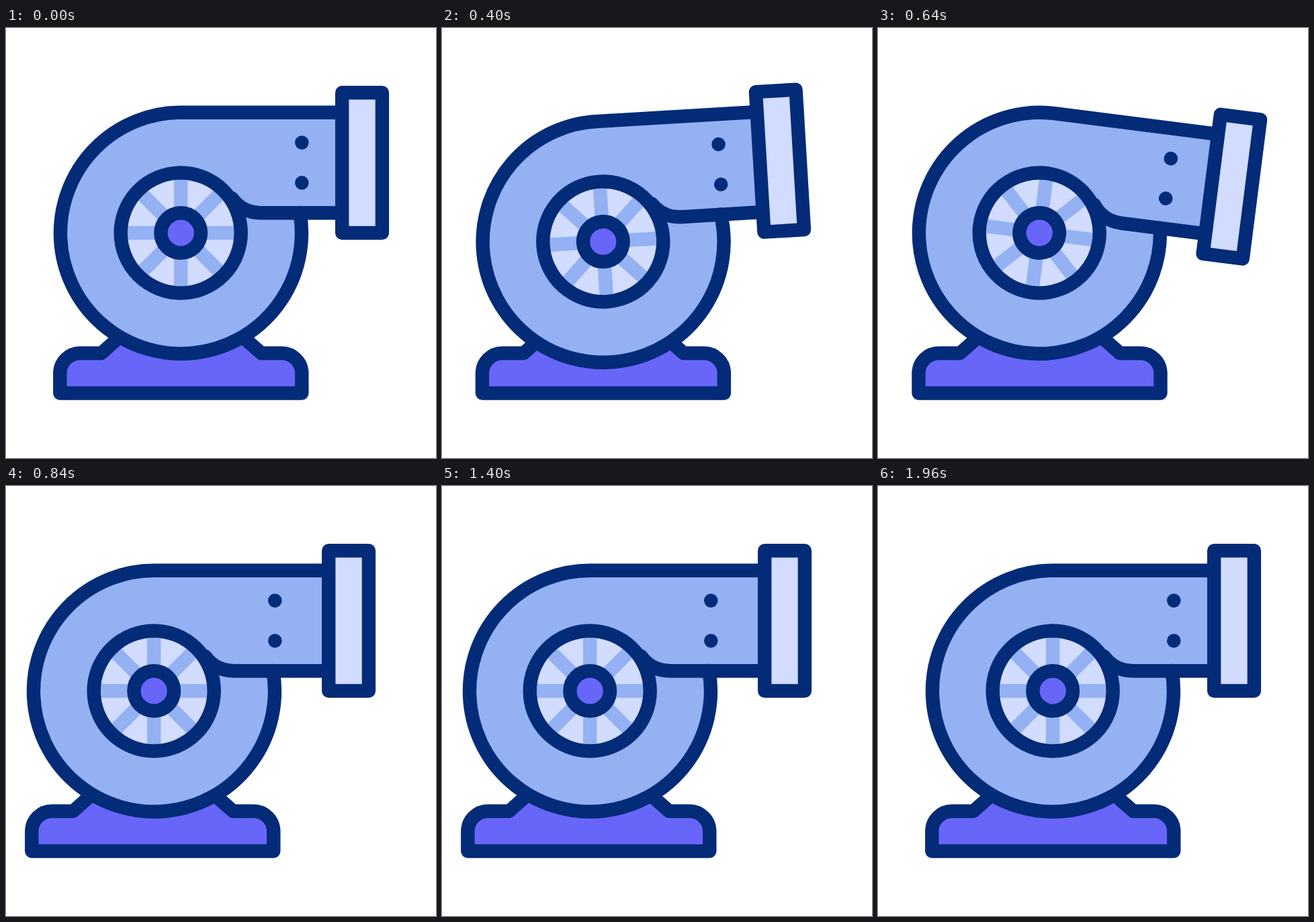
Recreate the animation shown at these times as an HTML page. Size 640x640 px, loop 2000 ms.

```html
<!DOCTYPE html>
<html lang="en">
<head>
<meta charset="utf-8">
<title>Turbocharger</title>
<style>
  html, body { margin: 0; width: 100%; height: 100%; overflow: hidden; background: #fff; }
  svg { display: block; width: 100%; height: 100%; }
  .line { stroke: #032b77; stroke-width: 20.4; stroke-linejoin: round; stroke-linecap: round; }
  .mid { fill: #93b1f3; }
  .pale { fill: #d2dcfe; }
  .accent { fill: #6865f9; }
  .dark { fill: #032b77; }
</style>
</head>
<body>
<svg viewBox="0 0 640 640">
  <path id="base" class="line accent" d="M80.3 543.5V514a30 30 0 0 1 30-30H142L190 441H331L380 484H410.3a30 30 0 0 1 30 30V543.5Z"/>
  <g id="air"></g>
  <g id="body">
    <circle class="mid" cx="260.2" cy="305" r="179.5"/>
    <path id="pipeFill" class="mid"/>
    <path id="shell" class="line" fill="none" stroke-linecap="butt"/>
    <circle class="pale" cx="260.2" cy="305" r="89.5"/>
    <g id="spokes" stroke="#93b1f3" stroke-width="20.4"></g>
    <circle class="line" fill="none" cx="260.2" cy="305" r="89.5"/>
    <circle class="line accent" cx="260.2" cy="305" r="29.8"/>
    <path id="lower" class="line" fill="none"/>
    <circle class="dark" cx="440.3" cy="170.6" r="10.3"/>
    <circle class="dark" cx="440.3" cy="230.4" r="10.3"/>
    <rect id="flange" class="line pale" x="500.2" y="96.2" width="59.7" height="208.8"/>
  </g>
</svg>
<script>
const $ = id => document.getElementById(id);
const LOOP = 2000;

function add(parent, name, attrs) {
  const el = document.createElementNS('http://www.w3.org/2000/svg', name);
  for (const k in attrs) el.setAttribute(k, attrs[k]);
  return parent.appendChild(el);
}

for (let a = 0; a < 180; a += 45)
  add($('spokes'), 'path', { d: 'M180 305H340', transform: `rotate(${a} 260.2 305)` });

const gusts = [140.5, 200.5, 260.5].map(y =>
  add($('air'), 'path', { class: 'line', d: `M0 ${y}h50` }));

// Eased value from [time, value] pairs
function track(t, keys) {
  if (t <= keys[0][0]) return keys[0][1];
  for (let i = 1; i < keys.length; i++) {
    const [t0, a] = keys[i - 1], [t1, b] = keys[i];
    if (t < t1) {
      const p = (t - t0) / (t1 - t0);
      return a + (b - a) * p * p * (3 - 2 * p);
    }
  }
  return keys[keys.length - 1][1];
}

const shift = [[80, 0], [300, -33], [540, 0], [742, -40], [1606, -40], [1965, 0]];
const baseShift = [[80, 0], [300, -33], [540, 0], [750, -42], [1630, -42], [1960, 0]];
const dip = [[80, 0], [300, 21], [540, 0]];
const tilt = [[80, 0], [300, -14.5], [540, 14.5], [742, 0]];
const reach = [[560, 0], [800, 20], [1606, 20], [1965, 0]];

function draw(t) {
  const ext = track(t, reach), end = 500 + ext;
  $('base').setAttribute('transform', `translate(${track(t, baseShift)} 0)`);
  $('body').setAttribute('transform',
    `translate(${track(t, shift)} ${track(t, dip)}) rotate(${track(t, tilt)} 260.2 305)`);
  $('pipeFill').setAttribute('d', `M260 125.8H${end}V275H260Z`);
  $('shell').setAttribute('d', `M${end} 125.8H264A179.5 179.5 0 1 0 437.4 275`);
  $('lower').setAttribute('d', `M${end} 275.2H380C361 275.2 346 267 336 253`);
  $('flange').setAttribute('transform', `translate(${ext} 0)`);
  // Short gusts leave the outlet while the pipe is stretched
  gusts.forEach((g, i) => {
    const p = (t - 840 - 40 * i) / 160;
    const on = p > 0 && p < 3;
    g.setAttribute('visibility', on ? 'visible' : 'hidden');
    g.setAttribute('transform', `translate(${480 + 180 * (p - Math.floor(p))} 0)`);
  });
}

const start = performance.now();
function tick() {
  draw((performance.now() - start) % LOOP);
  requestAnimationFrame(tick);
}
tick();
</script>
</body>
</html>
```
